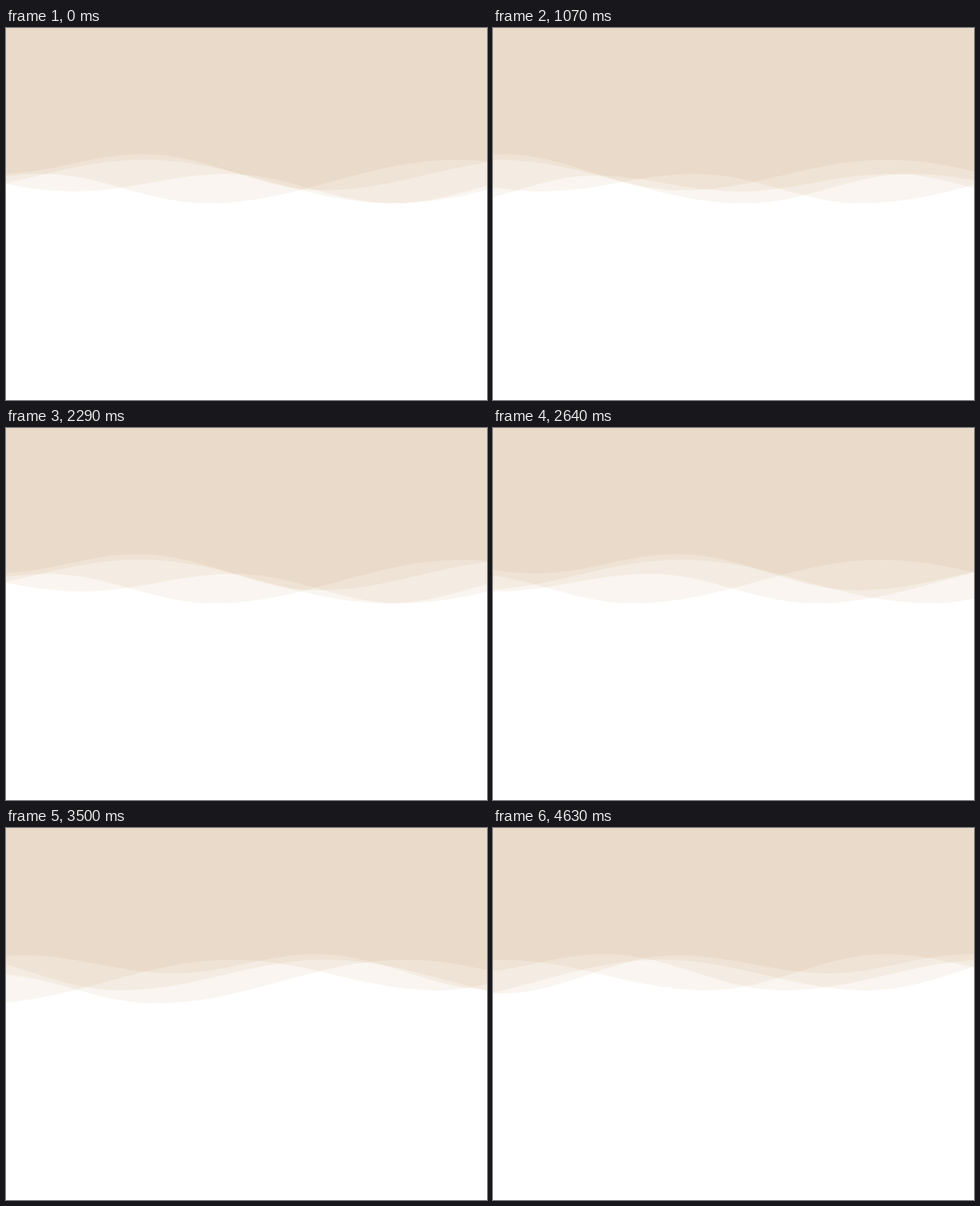
An HTML page with a canvas that plays this animation: 851x658 px, repeating every 4760 ms.

```html
<!DOCTYPE html>
<html>
<head>
<meta charset="utf-8">
<style>
  html, body { margin: 0; width: 100%; height: 100%; overflow: hidden; background: #fff; }
  canvas { display: block; }
</style>
</head>
<body>
<canvas id="stage" width="851" height="658"></canvas>
<script>
const ctx = document.getElementById('stage').getContext('2d');
const W = 851, H = 658, LOOP = 4760, STEP = 1000 / 14;
const TURN = 1257; // all waves reverse here
const SAND = [234, 218, 201];

// Alternating troughs and crests of the one profile all waves share
const profile = [
  [-1080, 310], [-820, 261], [-565, 289], [-293, 258], [0, 310], [442, 233],
  [806, 287], [1123, 223], [1373, 257], [1643, 225], [1955, 293]
];

// Place at the turn and speed in px/ms; waves moving right are mirrored
const waves = [[714, -0.337], [1065, -0.357], [396, 0.273], [1091, 0.259]];

function profileY(x) {
  const next = profile.findIndex(point => point[0] > x);
  const i = next < 0 ? profile.length - 1 : Math.max(next, 1);
  const [x0, y0] = profile[i - 1], [x1, y1] = profile[i];
  return y0 + (y1 - y0) * (1 - Math.cos(Math.PI * (x - x0) / (x1 - x0))) / 2;
}

// Each overlapping wave tints white by the same factor
function tint(layers) {
  return `rgb(${SAND.map(c => Math.round(255 * (c / 255) ** (layers / waves.length)))})`;
}

// The picture advances in steps and rests at both ends of the loop
function steppedTime(ms) {
  const t = Math.floor((ms + 14) / STEP) * STEP;
  return Math.min(Math.max(t, 195), 4643);
}

function draw(ms) {
  const travel = Math.abs(steppedTime(ms) - TURN);
  const columns = [];
  for (let x = 0; x <= W + 1; x += 2) {
    const ys = waves.map(([start, speed]) =>
      profileY(-Math.sign(speed) * (x - start - speed * travel)));
    columns.push([x, ys.sort((a, b) => b - a)]);
  }
  ctx.fillStyle = '#fff';
  ctx.fillRect(0, 0, W, H);
  waves.forEach((_, level) => {
    ctx.beginPath();
    ctx.moveTo(0, 0);
    for (const [x, ys] of columns) ctx.lineTo(x, ys[level]);
    ctx.lineTo(W + 1, 0);
    ctx.fillStyle = tint(level + 1);
    ctx.fill();
  });
}

const begin = performance.now();
function frame() {
  draw((performance.now() - begin) % LOOP);
  requestAnimationFrame(frame);
}
frame();
</script>
</body>
</html>
```
